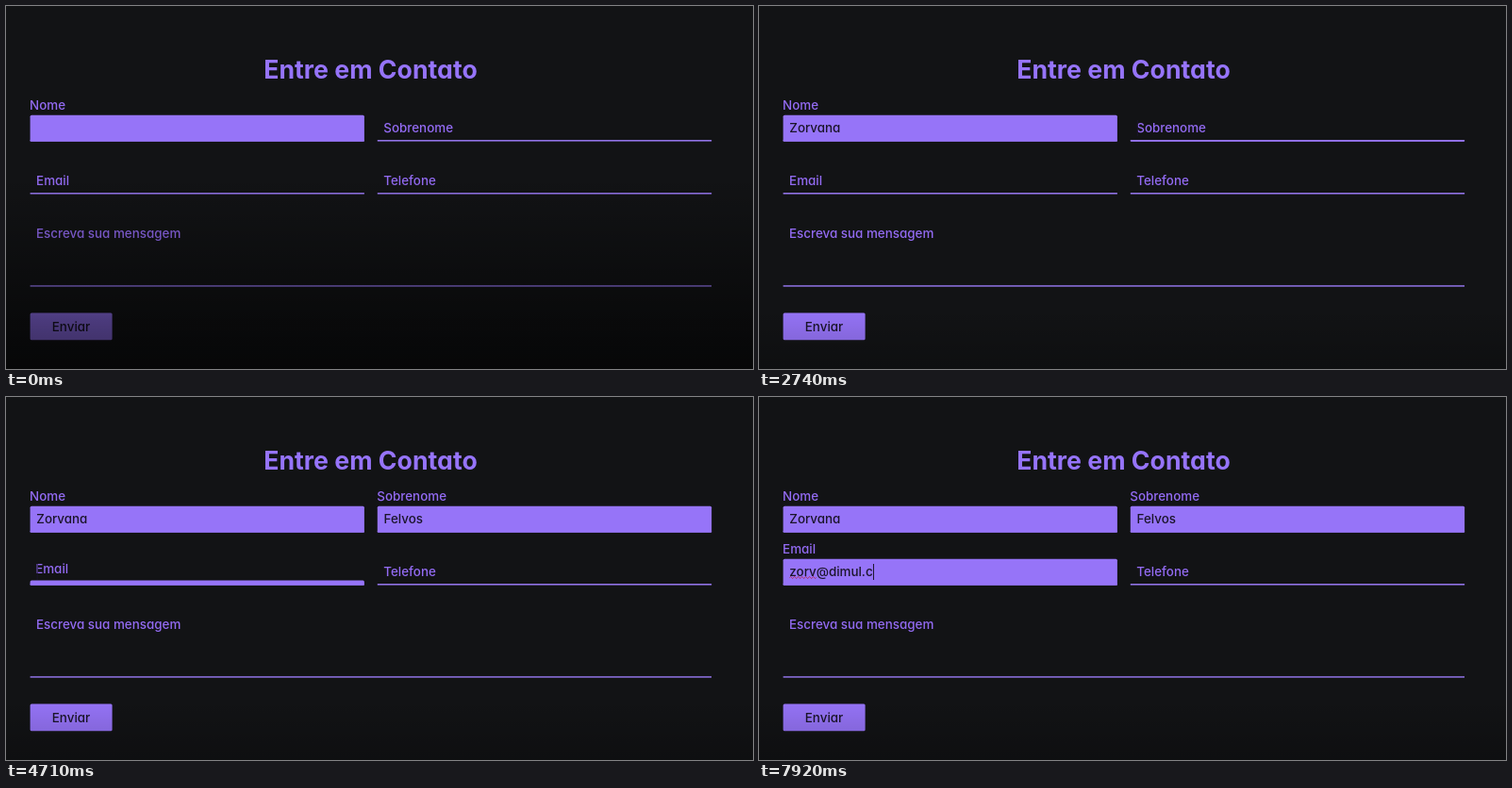
Write an HTML page that moves like this. It is 792x385 px and loops after 8 s.

```html
<!DOCTYPE html>
<html lang="pt">
<head>
<meta charset="utf-8">
<title>Entre em Contato</title>
<style>
  html, body { margin: 0; width: 100%; height: 100%; overflow: hidden; background: #121315; }
  svg { display: block; width: 100%; height: 100%; }
  text {
    font: 450 13.4px Inter, "Open Sans", sans-serif;
    font-feature-settings: "cv11";
    font-optical-sizing: none;
    fill: #936bf3;
  }
  .title { font-size: 26.7px; font-weight: 700; fill: #9674fa; text-anchor: middle; }
  .box { fill: #9674f8; }
  .line { fill: #9173e6; }
  .dark { fill: #1b152b; }
  .squiggle { fill: none; stroke: #b5264f; stroke-width: 1; }
</style>
</head>
<body>
<svg viewBox="0 0 792 385">
  <defs>
    <linearGradient id="shade" x2="0" y2="1">
      <stop offset="0" stop-opacity="0"/>
      <stop offset=".75" stop-opacity=".48"/>
      <stop offset="1" stop-opacity=".54"/>
    </linearGradient>
    <linearGradient id="foot" x2="0" y2="1">
      <stop offset="0" stop-opacity="0"/>
      <stop offset=".35" stop-opacity=".01"/>
      <stop offset="1" stop-opacity=".22"/>
    </linearGradient>
  </defs>
  <rect width="792" height="385" fill="#121315"/>
  <text class="title" x="386.5" y="77">Entre em Contato</text>
  <g id="fields"></g>
  <text x="32" y="246">Escreva sua mensagem</text>
  <rect class="line" x="25.6" y="296.2" width="722.4" height="1.5"/>
  <rect class="box" x="25.6" y="325.5" width="87" height="28.8" rx="1.5"/>
  <text class="dark" x="69" y="345" text-anchor="middle">Enviar</text>
  <path id="wavy" class="squiggle"/>
  <rect id="caret" class="dark" width="1" height="17"/>
  <rect y="290" width="792" height="95" fill="url(#foot)"/>
  <rect id="veil" y="180" width="792" height="205" fill="url(#shade)"/>
</svg>
<script>
const LOOP = 8000, BLINK = 500, SLIDE = 300;
const $ = id => document.getElementById(id);
const clamp = v => Math.max(0, Math.min(1, v));
const easeOut = p => 1 - (1 - p) ** 2;

function add(tag, attrs, content = "") {
  const el = document.createElementNS("http://www.w3.org/2000/svg", tag);
  set(el, attrs);
  el.textContent = content;
  return $("fields").appendChild(el);
}
function set(el, attrs) {
  for (const key in attrs) el.setAttribute(key, attrs[key]);
}

// open: start of the label slide; focus: caret arrival; keys: time of each keystroke
const fields = [
  { x: 25.6, y: 116, label: "Nome", value: "Zorvana", open: -SLIDE, focus: 590,
    keys: [1110, 1420, 1500, 1760, 1950, 2140, 2340] },
  { x: 393.8, y: 116, label: "Sobrenome", value: "Felvos", open: 2740, focus: 2740,
    keys: [3340, 3440, 3560, 3680, 3800, 3920] },
  { x: 25.6, y: 172, label: "Email", value: "zorv@dimul.c", open: 4690, focus: 4690,
    keys: [5180, 5340, 5500, 5680, 6290, 6600, 6780, 6960, 7160, 7400, 7620, 7900] },
  { x: 393.8, y: 172, label: "Telefone", value: "", open: Infinity, focus: Infinity, keys: [] }
];

for (const f of fields) {
  add("rect", { class: "line", x: f.x, y: f.y + 26, width: 354.3, height: 1.6 });
  f.box = add("rect", { class: "box", x: f.x, width: 354.3, rx: 1.5 });
  f.name = add("text", {}, f.label);
  f.text = add("text", { class: "dark", x: f.x + 6.7, y: f.y + 18 });
}

function drawField(f, t) {
  const p = easeOut(clamp((t - f.open) / SLIDE));
  const height = p ? 1.6 + 26.4 * p : 0;
  set(f.box, { y: f.y + 27.7 - height, height });
  set(f.name, { x: f.x - 0.5 + 7 * (1 - p), y: f.y + 18 - 24.5 * p });
  f.text.textContent = f.value.slice(0, f.keys.filter(k => k <= t).length);
}

function drawCaret(t) {
  const f = fields.filter(f => f.focus <= t).pop();
  let on = false;
  if (f) {
    const last = Math.max(f.focus, ...f.keys.filter(k => k <= t));
    on = (t - last) % (2 * BLINK) < BLINK;
    set($("caret"), { x: f.x + 7 + f.text.getComputedTextLength(), y: f.y + 5 });
  }
  $("caret").style.display = on ? "" : "none";
}

function drawWavy(t) {
  const f = fields[2];
  const waves = t < f.keys[4] ? 0 : 7;
  set($("wavy"), { d: waves ? `M${f.x + 7} ${f.y + 19.5}` + "q1 -2 2 0t2 0".repeat(waves) : "" });
}

const start = performance.now();

function draw(now) {
  const t = Math.max(0, now - start) % LOOP;
  for (const f of fields) drawField(f, t);
  drawCaret(t);
  drawWavy(t);
  set($("veil"), { opacity: (1 - clamp((t - 510) / 400)) ** 1.6 });
  requestAnimationFrame(draw);
}
requestAnimationFrame(draw);
</script>
</body>
</html>
```
